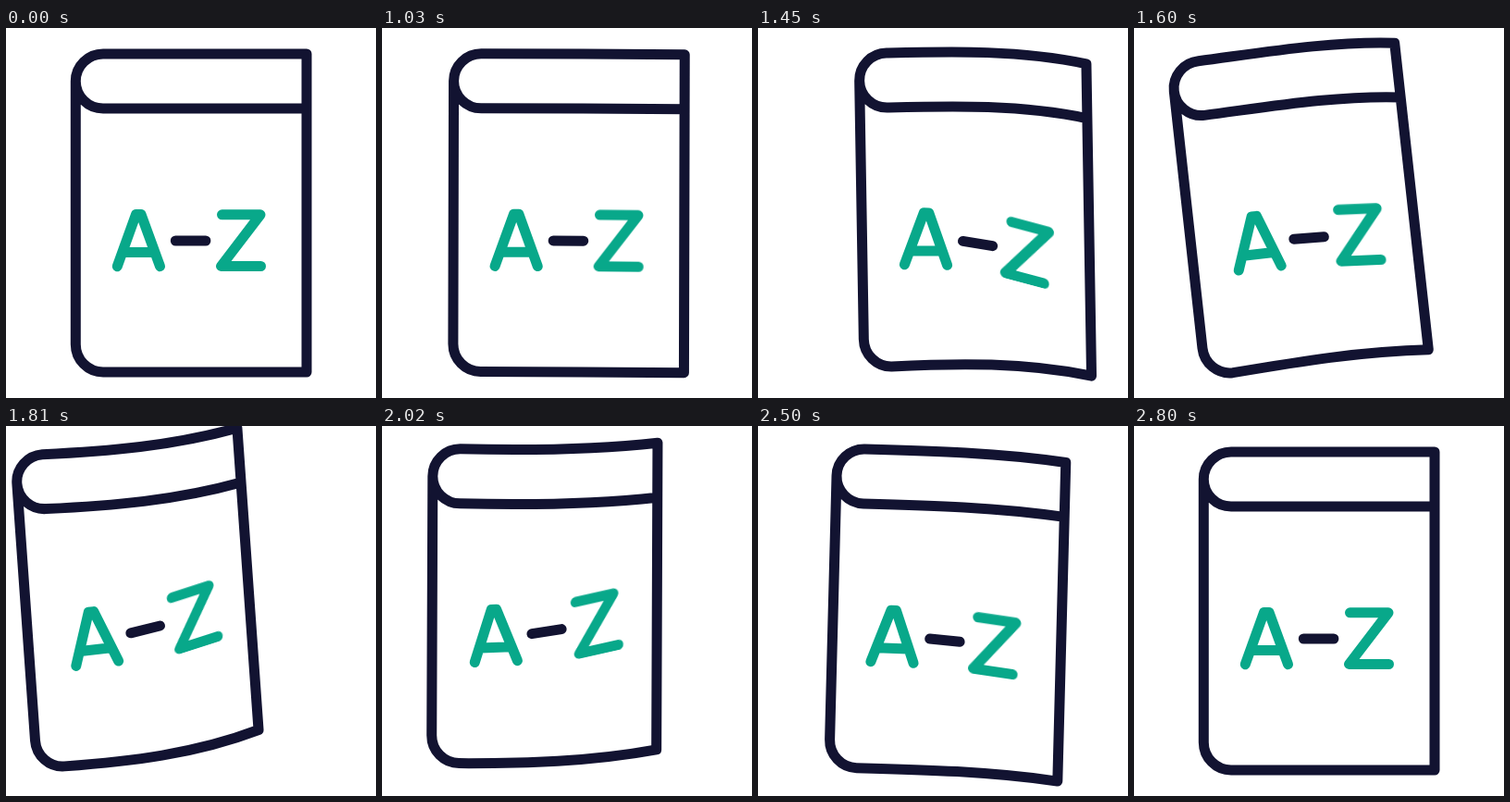
Write an HTML page without scripts that moves like this. It is 400 px wide and 400 px high and loops after 2830 ms.

```html
<!DOCTYPE html>
<html lang="en">
<head>
<meta charset="utf-8">
<title>Dictionary</title>
<style>
html, body { margin: 0; width: 100%; height: 100%; overflow: hidden; background: #fff; }
svg { display: block; width: 100vw; height: 100vh; overflow: hidden; }

path {
  fill: none;
  stroke: #121331;
  stroke-width: 11;
  stroke-linecap: round;
  stroke-linejoin: round;
}
.green { stroke: #08a88a; }

.book, .cover, .word, .a, .dash, .z {
  animation: 2830ms cubic-bezier(.333, 0, .667, 1) infinite;
}
.book { transform-origin: 200px 200px; animation-name: slide, tilt; }
.cover { animation-name: bend; }
.word { animation-name: drift; }
.a { transform-origin: 143px 230px; animation-name: sway-a; }
.dash { transform-origin: 168px 230px; animation-name: sway-dash; }
.z { transform-origin: 194px 230px; animation-name: sway-z; }

/* whole book: damped swing right, left, right */
@keyframes slide {
  0%, 35.336% { translate: 0 0; }
  45.936% { translate: 64.7px -2px; }
  62.898% { translate: -54.5px -4.5px; }
  79.859% { translate: 12px -1.2px; }
  96.82%, 100% { translate: 0 0; }
}
@keyframes tilt {
  0%, 35.336% { rotate: 0deg; }
  45.936% { rotate: 4.5deg; }
  56.537% { rotate: -6.3deg; }
  79.859% { rotate: 3deg; }
  96.82%, 100% { rotate: 0deg; }
}

/* the free edge lags behind the spine */
@keyframes bend {
  0%, 35.336% {
    d: path("M325 87C252 87 178 87 105 87C88.7 87 75.3 73.8 75.3 57.5C75.3 41.2 88.7 28 105 28C178 28 252 28 325 28L325 372C252 372 178 372 105 372C88.6 372 75.3 358.5 75.3 342L75.3 57.5");
  }
  45.936% {
    d: path("M322 107C250 88 177 87 105 87C88.7 87 75.3 73.8 75.3 57.5C75.3 41.2 88.7 28 105 28C177 28 250 29 322 48L322 387C250 367 177 365 105 367C88.6 367 75.3 353.5 75.3 337L75.3 57.5");
    animation-timing-function: cubic-bezier(.333, 0, .667, .43);
  }
  56.537% {
    d: path("M318 91C247 81 176 85.5 105 87C88.7 87 75.3 73.8 75.3 57.5C75.3 41.2 88.7 28 105 28C176 26.5 247 22 318 32L318 365.5C247 359 176 363 105 367C88.6 367 75.3 353.5 75.3 337L75.3 57.5");
    animation-timing-function: cubic-bezier(.333, .43, .667, 1);
  }
  65.018% {
    d: path("M317 73C246 88 176 89 105 87C88.7 87 75.3 73.8 75.3 57.5C75.3 41.2 88.7 28 105 28C176 30 246 29 317 14L317 341C246 363 176 366 105 366C88.6 366 75.3 352.5 75.3 336L75.3 57.5");
  }
  84.099% {
    d: path("M322 98C250 87 177 87 105 87C88.7 87 75.3 73.8 75.3 57.5C75.3 41.2 88.7 28 105 28C177 28 250 28 322 39L322 384C250 373 177 373 105 373C88.6 373 75.3 359.5 75.3 343L75.3 57.5");
  }
  98.94%, 100% {
    d: path("M325 87C252 87 178 87 105 87C88.7 87 75.3 73.8 75.3 57.5C75.3 41.2 88.7 28 105 28C178 28 252 28 325 28L325 372C252 372 178 372 105 372C88.6 372 75.3 358.5 75.3 342L75.3 57.5");
  }
}

/* letters follow the bend of the cover */
@keyframes drift {
  0%, 45.936% { translate: 0 0; }
  60.777% { translate: 4px 0; }
  81.979% { translate: -4px 0; }
  98.94%, 100% { translate: 0 0; }
}
@keyframes sway-a {
  0%, 35.336% { rotate: 0deg; }
  48.057% { rotate: 2deg; }
  67.138% { rotate: -3deg; }
  85.159% { rotate: .5deg; }
  98.94%, 100% { rotate: 0deg; }
}
@keyframes sway-dash {
  0%, 35.336% { rotate: 0deg; }
  48.057% { rotate: 12deg; }
  67.138% { rotate: -11.5deg; }
  85.159% { rotate: 5deg; }
  98.94%, 100% { rotate: 0deg; }
}
@keyframes sway-z {
  0%, 35.336% { transform: rotate(0deg) skewY(0deg); }
  48.057% { transform: rotate(8deg) skewY(10.5deg); }
  67.138% { transform: rotate(-6.7deg) skewY(-9.6deg); }
  85.159% { transform: rotate(3.4deg) skewY(4.6deg); }
  98.94%, 100% { transform: rotate(0deg) skewY(0deg); }
}
</style>
</head>
<body>
<svg viewBox="0 0 400 400" role="img" aria-label="A to Z book">
  <g class="book">
    <path class="cover" d="M325 87C252 87 178 87 105 87C88.7 87 75.3 73.8 75.3 57.5C75.3 41.2 88.7 28 105 28C178 28 252 28 325 28L325 372C252 372 178 372 105 372C88.6 372 75.3 358.5 75.3 342L75.3 57.5"/>
    <g class="word">
      <path class="a green" d="M120.3 257.7L140.5 201.5H146L166.5 257.7M127 242.5H160"/>
      <path class="dash" d="M183.3 230H215.9"/>
      <path class="z green" d="M233.5 201.8H275L232.5 257.5H275.5"/>
    </g>
  </g>
</svg>
</body>
</html>
```
